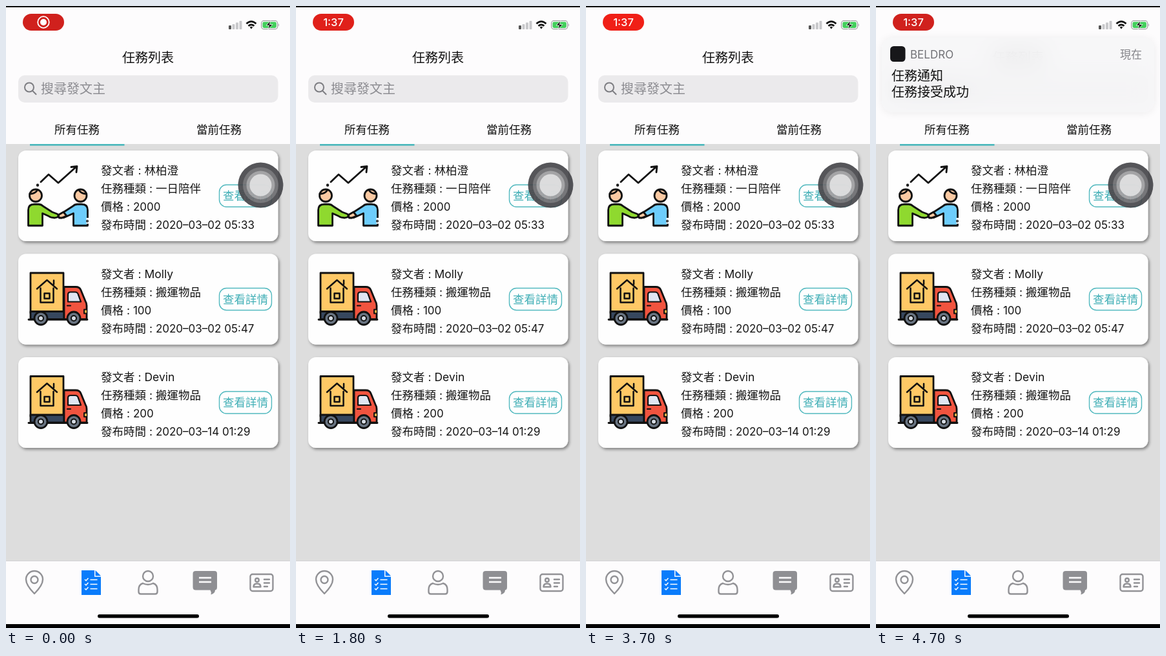
Recreate the animation shown at these times as an HTML page. Size 440 by 960 pixels, loop 4.8 s.

```html
<!DOCTYPE html>
<html lang="zh-Hant">
<head>
<meta charset="utf-8">
<title>任務列表</title>
<style>
  html, body { margin: 0; width: 440px; height: 960px; overflow: hidden; background: #fdfcfd; }
  body { position: relative; font-family: Inter, "Noto Sans CJK TC", "Noto Sans CJK", sans-serif; }
  svg { position: absolute; left: 0; top: 0; display: block; }
  text { font-size: 17.5px; white-space: pre; }
  .num { font-size: 17px; }
  .big { font-size: 20px; }
  .mid { text-anchor: middle; }
  .ink { stroke: #111; stroke-width: 2.8; stroke-linecap: round; stroke-linejoin: round; }
  .line { fill: none; }
  .grey { fill: none; stroke: #929296; stroke-width: 2.4; stroke-linecap: round; stroke-linejoin: round; }

  .pill { animation: pulse 1.2s ease-in-out infinite alternate; }
  .rec { transform-box: fill-box; transform-origin: center; animation: rec 4.8s linear infinite; }
  .clock { animation: clock 4.8s linear infinite; }
  @keyframes pulse { from { fill: #d0211d; } to { fill: #f01f17; } }
  @keyframes rec {
    0%, 3.1% { opacity: 1; transform: none; }
    13.5%, 100% { opacity: 0; transform: scale(.6); }
  }
  @keyframes clock { 0%, 3.1% { opacity: 0; } 13.5%, 100% { opacity: 1; } }

  .banner {
    position: absolute; left: 9px; top: 49px; width: 422px; height: 115px;
    border-radius: 17px; background: rgba(246, 246, 247, .82);
    backdrop-filter: blur(18px); box-shadow: 0 1px 14px rgba(0, 0, 0, .07);
    animation: drop 4.8s infinite;
  }
  @keyframes drop {
    0%, 77.1% { transform: translateY(-190px); animation-timing-function: cubic-bezier(.2, .75, .3, 1); }
    87.5%, 100% { transform: none; }
  }
  .edge { position: absolute; left: 0; width: 440px; background: #000; }
</style>
</head>
<body>
<svg width="440" height="960" viewBox="0 0 440 960">
  <defs>
    <filter id="shade" x="-5%" y="-10%" width="110%" height="125%">
      <feDropShadow dx="2" dy="2.5" stdDeviation="2" flood-color="#000" flood-opacity=".42"/>
    </filter>

    <g id="card">
      <rect x="19" y="223" width="402.500" height="140" rx="12" fill="#fefefe" filter="url(#shade)"/>
      <rect x="330.500" y="276" width="81" height="34" rx="11" fill="none" stroke="#52b9bf" stroke-width="1.400"/>
      <text class="mid" x="371" y="299.300" fill="#40afb6">查看詳情</text>
    </g>

    <g id="truck" class="ink">
      <path fill="#ffc966" d="M38 252.500h51v62h-51z"/>
      <path fill="#37475e" d="M38 312h52v12h-52z"/>
      <path fill="#f1543f" d="M90 274h18q6 0 8 5l7 17q2 3 2 7v21H90z"/>
      <path fill="#dfe6f2" stroke-width="2.200" d="M96 297v-11q0-4 4-4h7q4 0 5 4l4 11z"/>
      <path stroke-width="2.200" d="M95 303h5"/>
      <path fill="#ffb64a" stroke-width="2" d="M125 309h-4v6h4"/>
      <path d="M35 324.500h91"/>
      <g class="line" stroke-width="2.500">
        <path d="M48 277l15.500-13.500L79 277M74 270v-6M53.500 276v22h20v-22"/>
        <path d="M59.500 284h8v8h-8z"/>
      </g>
      <g fill="#6a7583">
        <circle cx="54" cy="322.500" r="10"/><circle cx="105" cy="322.500" r="10"/>
      </g>
      <g fill="#d5dbe3" stroke-width="2">
        <circle cx="54" cy="322.500" r="4"/><circle cx="105" cy="322.500" r="4"/>
      </g>
    </g>
  </defs>

  <rect width="440" height="960" fill="#fdfcfd"/>

  <!-- status bar -->
  <rect class="pill" x="26" y="12" width="64" height="26" rx="13"/>
  <g class="rec">
    <circle cx="58" cy="25" r="8.800" fill="none" stroke="#fff" stroke-width="1.800"/>
    <circle cx="58" cy="25" r="5" fill="#fff"/>
  </g>
  <text class="mid clock" x="58" y="31" fill="#fff" style="font-size:16.500px;font-weight:500">1:37</text>
  <g fill="#c8c8cb">
    <rect x="345" y="30" width="4" height="6" rx="1" fill="#555"/>
    <rect x="350.500" y="28" width="4" height="8" rx="1"/>
    <rect x="356" y="25.500" width="4" height="10.500" rx="1"/>
    <rect x="361.500" y="23" width="4" height="13" rx="1"/>
  </g>
  <g fill="none" stroke="#111" stroke-width="2.700">
    <path d="M372.500 27.300q7.500-6.800 15 0M375.500 30.800q4.500-4 9 0"/>
    <path d="M377.700 32.800q2.300-2 4.600 0L380 35.500z" fill="#111" stroke="none"/>
  </g>
  <rect x="395.700" y="22.700" width="25" height="13" rx="4" fill="none" stroke="#a2a2a4" stroke-width="1.300"/>
  <rect x="397.500" y="24.500" width="21.400" height="9.400" rx="2.300" fill="#43cf5c"/>
  <path d="M422.200 27v4.500q2-2.200 0-4.500z" fill="#a2a2a4"/>
  <path d="M410 22.500l-7 7.500h4.500l-1.500 6 7-7.500h-4.500z" fill="#111" stroke="#fdfcfd" stroke-width=".8"/>

  <!-- header -->
  <text class="mid big" x="220" y="87" font-weight="500" fill="#111">任務列表</text>
  <rect x="19" y="107" width="402.500" height="42" rx="10" fill="#ebeaec"/>
  <g fill="none" stroke="#7d7d82" stroke-width="2" stroke-linecap="round">
    <circle cx="36" cy="125.500" r="7"/><path d="M41 130.800l5.500 5.500"/>
  </g>
  <text class="big" x="54" y="134.500" fill="#8c8c91">搜尋發文主</text>
  <text class="mid" x="110" y="196.500" fill="#111">所有任務</text>
  <text class="mid" x="330" y="196.500" fill="#111">當前任務</text>

  <!-- list -->
  <rect y="213" width="440" height="643" fill="#dddddd"/>
  <rect x="37" y="213" width="146.500" height="2.600" fill="#49b7bb"/>

  <g fill="#151515">
    <use href="#card"/>
    <text x="147" y="260">發文者 : 林柏澄</text>
    <text x="147" y="288.300">任務種類 : 一日陪伴</text>
    <text x="147" y="316.300">價格 : <tspan class="num">2000</tspan></text>
    <text x="147" y="344.300">發布時間 : <tspan class="num">2020–03–02 05:33</tspan></text>
    <g class="ink">
      <path class="line" d="M54 271.500l12-11.500 15 13 28-25M101 248.500l9-1-1 9"/>
      <circle cx="49" cy="276.500" r=".8"/>
      <path fill="#8fd92f" d="M34.500 339v-24q0-9 9-9h7q4 0 7 3l14 9 8 3q3 3 0 5l-4 1q-6 0-10-3l-9-4v19z"/>
      <path fill="#6dcdfc" d="M126.500 339v-24q0-9-9-9h-7q-4 0-7 3l-14 9-7 4q-3 3 0 5 6 1 13-3l9-4v19z"/>
      <path fill="#fbc9a2" d="M82 322l7-4 5 6-8 3q-6 0-4-5z"/>
      <path stroke="#fefefe" stroke-width="4" stroke-linecap="butt" d="M126.500 327v9"/>
      <circle cx="126" cy="332" r=".6"/>
      <g fill="#fbc9a2">
        <circle cx="46" cy="292.500" r="9.500"/><circle cx="115.500" cy="292.500" r="9.500"/>
      </g>
      <path class="line" d="M36.800 290q8 0 12-6M124.800 290q-8 0-12-6"/>
    </g>
  </g>

  <g fill="#151515" transform="translate(0 159.500)">
    <use href="#card"/><use href="#truck"/>
    <text x="147" y="260">發文者 : Molly</text>
    <text x="147" y="288.300">任務種類 : 搬運物品</text>
    <text x="147" y="316.300">價格 : <tspan class="num">100</tspan></text>
    <text x="147" y="344.300">發布時間 : <tspan class="num">2020–03–02 05:47</tspan></text>
  </g>

  <g fill="#151515" transform="translate(0 319)">
    <use href="#card"/><use href="#truck"/>
    <text x="147" y="260">發文者 : Devin</text>
    <text x="147" y="288.300">任務種類 : 搬運物品</text>
    <text x="147" y="316.300">價格 : <tspan class="num">200</tspan></text>
    <text x="147" y="344.300">發布時間 : <tspan class="num">2020–03–14 01:29</tspan></text>
  </g>

  <!-- floating touch button -->
  <circle cx="394.500" cy="276.500" r="35" fill="#454549" fill-opacity=".91"/>
  <g fill="#fff">
    <circle cx="394.500" cy="276.500" r="27.500" fill-opacity=".2"/>
    <circle cx="394.500" cy="276.500" r="22" fill-opacity=".33"/>
    <circle cx="394.500" cy="276.500" r="17" fill-opacity=".62"/>
  </g>

  <!-- tab bar -->
  <rect y="856" width="440" height="98" fill="#fdfcfd"/>
  <path d="M0 856.500h440" stroke="#d2d2d4"/>
  <g class="grey">
    <path d="M44 907q-13-13-13-22a13 13 0 0 1 26 0q0 9-13 22z"/>
    <circle cx="44" cy="885.500" r="5.500"/>
    <circle cx="220" cy="880" r="8"/>
    <path d="M212 891q-6.500 2-6.500 10v3q0 3.500 3.500 3.500h22q3.500 0 3.500-3.500v-3q0-8-6.500-10-8 4-16 0z"/>
    <rect x="378.500" y="877" width="35" height="26" rx="3.500"/>
    <circle cx="389" cy="886" r="2.800"/>
    <path d="M383.500 896.500q0-5 5.500-5t5.500 5zM400 885h8M400 890.500h8M400 896h5"/>
  </g>
  <path d="M117 871h20v10h10v28h-30z" fill="#0a7cfb"/>
  <path d="M138.500 871l8.500 8.500h-8.500z" fill="#0a7cfb"/>
  <path d="M122 885l2 2 3.500-4M122 892l2 2 3.500-4M122 899l2 2 3.500-4M130.500 885.500h11M130.500 892.500h11M130.500 899.500h11"
    fill="none" stroke="#fff" stroke-width="1.500"/>
  <path d="M294 872h29q4 0 4 4v21q0 4-3 4.500 0 5-6.500 7 1-4-1-7H294q-4.500 0-4.500-4.500v-21q0-4 4.500-4z" fill="#8f8f93"/>
  <path d="M299 882.500h19M299 889h19" stroke="#fdfcfd" stroke-width="2.300"/>
  <rect x="142" y="939" width="157" height="5.500" rx="2.750" fill="#000"/>
</svg>

<div class="banner">
  <svg width="422" height="115" viewBox="9 49 422 115">
    <rect x="22" y="62" width="23.500" height="24" rx="5.500" fill="#17171a"/>
    <text x="53" y="81" class="num" fill="#717176">BELDRO</text>
    <text x="412" y="81" class="num" text-anchor="end" fill="#85858a">現在</text>
    <text x="24" y="114.500" class="big" font-weight="500" fill="#111">任務通知</text>
    <text x="24" y="139.500" class="big" fill="#111">任務接受成功</text>
  </svg>
</div>

<div class="edge" style="top:0;height:2px"></div>
<div class="edge" style="top:954px;height:6px"></div>
</body>
</html>
```
